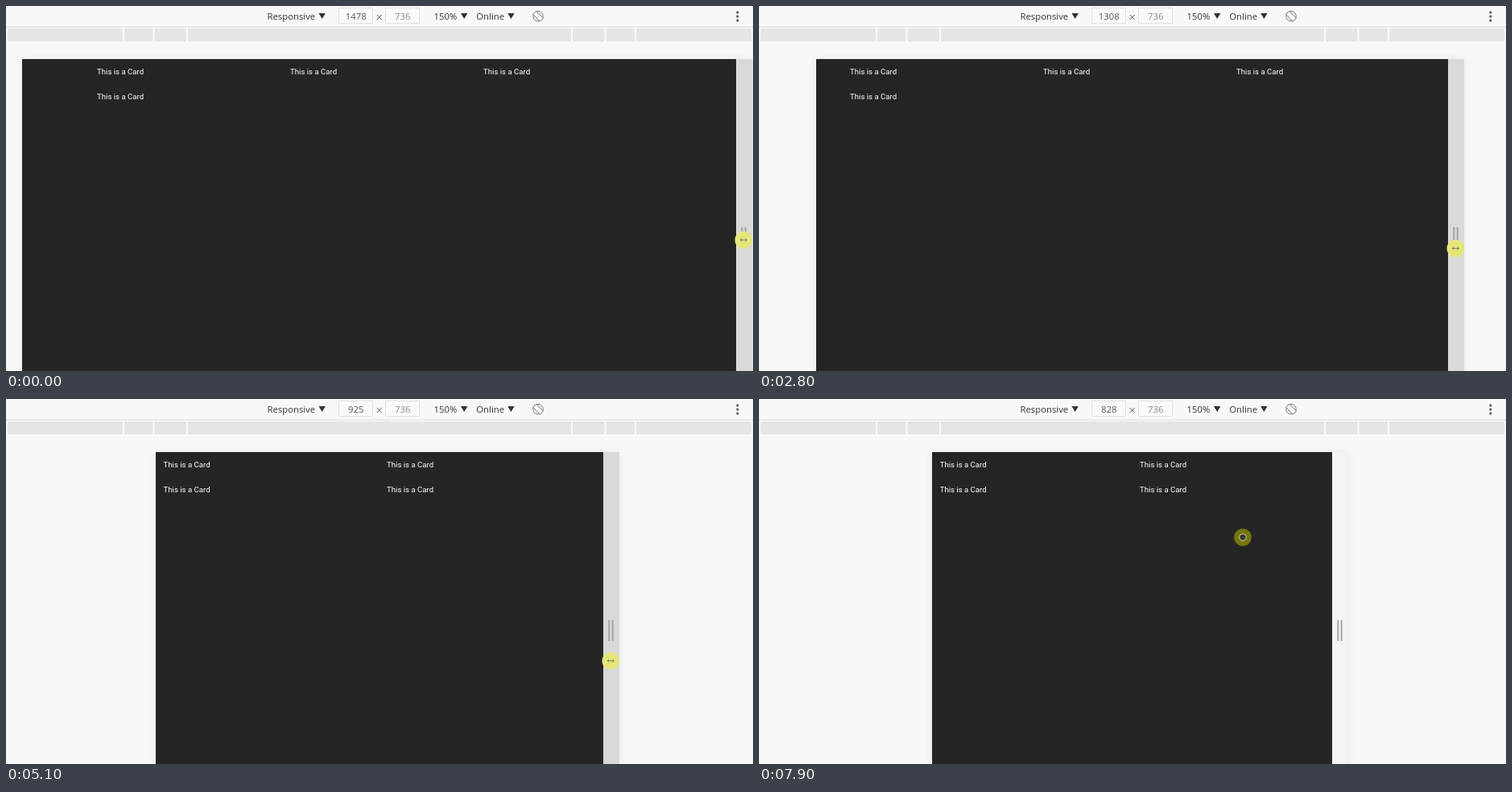
Write an HTML page that moves like this. It is 928 px wide and 454 px high and loops after 8 s.

```html
<!DOCTYPE html>
<html lang="en">
<head>
<meta charset="utf-8">
<title>Responsive cards</title>
<style>
  html, body { margin: 0; width: 100%; height: 100%; overflow: hidden; background: #f8f8f8; }
  svg { display: block; }
  .bar { font: 11.3px "Open Sans", "Noto Sans", sans-serif; fill: #333; }
  .mid { text-anchor: middle; }
  .card { font: 9.6px Roboto, sans-serif; fill: #fff; }
  #view { filter: drop-shadow(0 0 4px #00000014); }
</style>
</head>
<body>
<svg width="928" height="454" viewBox="0 0 928 454">
  <rect width="928" height="454" fill="#f8f8f8"/>
  <path d="M0 26H928" stroke="#dcdcdc"/>
  <g id="rulers" fill="#e5e5e5"></g>
  <g class="bar">
    <text x="324.5" y="17">Responsive</text>
    <text x="531.5" y="17">150%</text>
    <text x="584.3" y="17">Online</text>
    <path d="M388.5 9h8.4l-4.2 7zM565 9h8.4l-4.2 7zM623.2 9h8.4l-4.2 7z"/>
    <path d="M413.5 2.5h42v19h-42zM471.5 2.5h42v19h-42z" fill="#fafafa" stroke="#e2e2e2"/>
    <path d="M460.7 11l6 6m0-6l-6 6" stroke="#555"/>
    <text id="size" class="mid" x="434.7" y="17" fill="#555"></text>
    <text class="mid" x="492.7" y="17" fill="#8a8a8a">736</text>
    <g fill="none" stroke="#666" stroke-width=".9">
      <circle cx="661" cy="12.7" r="6.2"/>
      <rect x="658.1" y="6.4" width="5.8" height="12.6" rx="1" fill="#f8f8f8" transform="rotate(-45 661 12.7)"/>
    </g>
    <path d="M908.8 8v0M908.8 13v0M908.8 18v0" stroke="#666" stroke-width="3.4" stroke-linecap="round"/>
  </g>
  <g id="view">
    <rect id="panel" y="66" height="400" fill="#252525"/>
    <rect id="handle" y="66" width="20" height="400"/>
  </g>
  <path id="grip" d="M7.3 275v26M11.7 275v26" stroke="#a2a2a2" stroke-width="1.9"/>
  <g id="cards"></g>
  <g id="cursor">
    <circle id="halo" r="10.8"/>
    <path id="arrows" d="M-2 -2L-4.2 0L-2 2M2 -2L4.2 0L2 2M-4 0H4" fill="none" stroke="#666" stroke-width=".8"/>
    <circle id="dot" r="4.2" fill="#3a3a22" stroke="#ddd" stroke-width=".9"/>
  </g>
</svg>
<script>
const $ = id => document.getElementById(id);
const set = (id, attrs) => { for (const k in attrs) $(id).setAttribute(k, attrs[k]); };

const LOOP = 8000, STEP = 100, CENTER = 463.7, ZOOM = 0.6;
const DRAG = 1800, RELEASE = 6300;

// Key points: time first, then the values to blend
const WIDTH = [[1700, 1478], [2100, 1448], [2600, 1355], [3400, 1165],
  [4200, 1045], [5100, 925], [6000, 835], [6200, 828]];
const POINTER = [[RELEASE, 721, 333], [7100, 442, 96], [7300, 407, 79], [7900, 601, 172]];

function blend(keys, t) {
  const i = keys.findIndex(k => k[0] > t);
  if (i < 1) return keys.at(i).slice(1);
  const a = keys[i - 1], b = keys[i], f = (t - a[0]) / (b[0] - a[0]);
  return a.map((v, n) => v + (b[n] - v) * f).slice(1);
}

// Ruler segments mirror around the middle of the stage
const edges = [2, 147, 184.5, 226];
const stops = [...edges, ...edges.map(x => 930 - x).reverse()];
$('rulers').innerHTML = stops.slice(0, -1).map((x, i) =>
  `<rect x="${x}" y="28" width="${stops[i + 1] - x - 2}" height="16"/>`).join('');
$('cards').innerHTML = '<text class="card">This is a Card</text>'.repeat(4);
const cards = [...$('cards').children];

function draw(t) {
  const [width] = blend(WIDTH, t);
  const half = width * ZOOM / 2;
  const left = Math.round(CENTER - half), right = Math.ceil(CENTER + half - 0.1);
  const [x, y] = t < RELEASE
    ? [right + 9.3, 291 + Math.max(0, t - DRAG) * 0.0105]
    : blend(POINTER, t);
  const inside = x < right;

  $('size').textContent = Math.round(width);
  set('panel', { x: left, width: right - left });
  set('handle', { x: right, fill: inside ? '#f4f4f4' : '#d9d9d9' });
  set('grip', { transform: `translate(${right})` });

  const box = Math.min(width, 1200) * ZOOM;
  const cols = width > 992 ? 3 : 2;
  cards.forEach((card, i) => {
    card.setAttribute('x', CENTER - 0.2 - box / 2 + 9.6 + (i % cols) * box / cols);
    card.setAttribute('y', 85.2 + Math.floor(i / cols) * 30.6);
  });

  set('cursor', { transform: `translate(${x} ${y})` });
  set('halo', { fill: inside ? '#77750f' : '#e5e57a' });
  set('arrows', { visibility: inside ? 'hidden' : 'visible' });
  set('dot', { visibility: inside ? 'visible' : 'hidden' });
}

const start = performance.now();
function tick() {
  const t = (performance.now() - start) % LOOP;
  draw(Math.floor(t / STEP) * STEP);
  requestAnimationFrame(tick);
}
tick();
</script>
</body>
</html>
```
